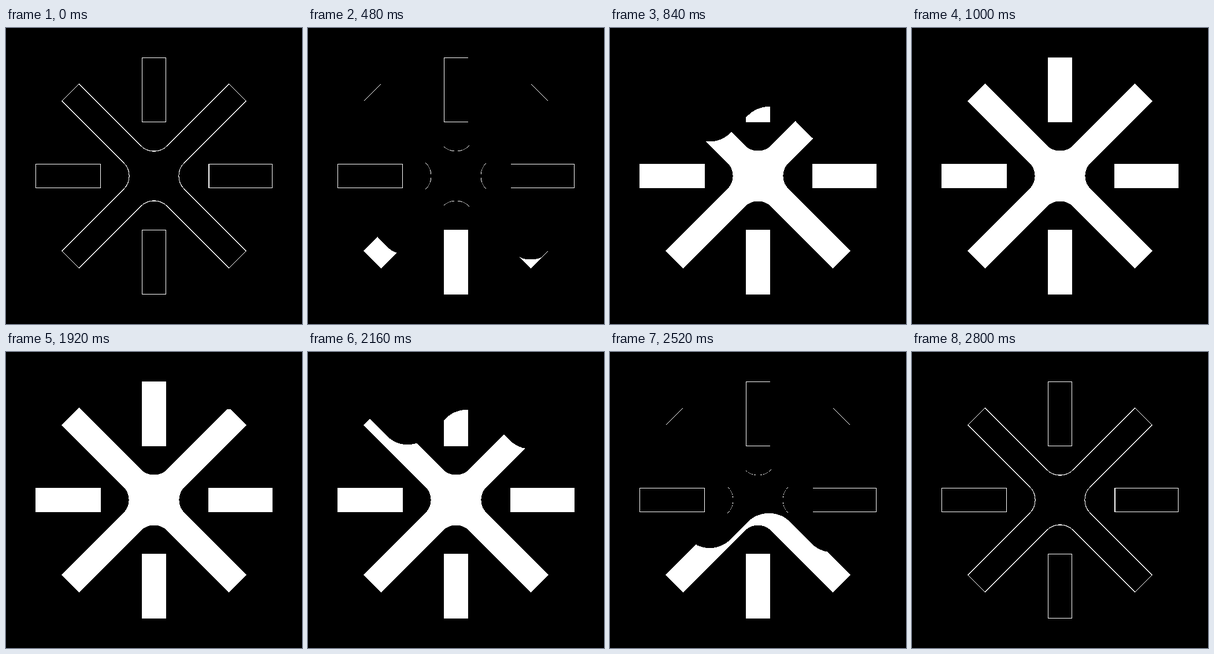
Recreate the animation shown at these times as an HTML page with a canvas. Size 512x512 px, loop 2.9 s.

```html
<!DOCTYPE html>
<html>
<head>
<meta charset="utf-8">
<style>
html, body { margin: 0; width: 100%; height: 100%; overflow: hidden; background: #000; }
canvas { display: block; }
</style>
</head>
<body>
<canvas id="stage" width="512" height="512"></canvas>
<script>
const ctx = document.getElementById('stage').getContext('2d', { willReadFrequently: true });
const LOOP = 2900, STEP = 40, FULL_WIDTH = 1.05;

// The star: a cross with rounded inner corners and four bars.
const star = new Path2D();
function cross(near, far, inner, radius) {
  for (let i = 0; i < 4; i++) {
    const c = [1, 0, -1, 0][i], s = [0, 1, 0, -1][i];
    const at = (x, y) => [256 + x * c - y * s, 256 + x * s + y * c];
    if (i) star.lineTo(...at(-near, -far));
    else star.moveTo(...at(-near, -far));
    star.arcTo(...at(0, -inner), ...at(near, -far), radius);
    star.lineTo(...at(near, -far));
  }
  star.closePath();
}
function bar(left, top, right, bottom) {
  star.rect(left, top, right - left, bottom - top);
}
cross(129.7, 159.3, 29.6, 32);
bar(235.4, 51.4, 276.95, 162.6);
bar(235.4, 349.4, 276.6, 460.6);
bar(51.4, 235.4, 163.6, 276.6);
bar(351, 235.4, 460.6, 276.6);

// Stretches of the outline that break up first as it thins.
const gaps = new Path2D('M186 157L234 205M186 355L234 307M308 234L313 229M308 278L313 283');

// Rounded zigzag surface of the fill.
const crests = [[68, 208], [172, 312.5], [275, 210], [385, 320], [490, 215], [600, 325]];
function surface(shift) {
  const p = new Path2D();
  p.moveTo(-40, 316 + shift);
  for (let i = 0; i < crests.length - 1; i++) {
    const [x, y] = crests[i], [nx, ny] = crests[i + 1];
    p.arcTo(x, y + shift, nx, ny + shift, 51);
  }
  p.lineTo(600, 325 + shift);
  p.lineTo(600, 900);
  p.lineTo(-40, 900);
  return p;
}

function fillShift(t) {
  if (t < 80 || t >= 2800) return 999;
  if (t < 1000) {
    const u = t - 680;
    return -0.555 * u - 0.00024 * u * u;
  }
  if (t < 1920) return -999;
  const u = t - 2440;
  return 0.567 * u + 0.00035 * u * u;
}

// The outline thins slowly, then quickly, and comes back the other way round.
function outlineWidth(t) {
  const u = t < 1000 ? (t - 60) / 660 : (2800 - t) / 397;
  return FULL_WIDTH * (1 - Math.min(1, Math.max(0, u)) ** 3);
}

function strokeStar(width) {
  ctx.lineWidth = width;
  ctx.strokeStyle = '#fff';
  ctx.stroke(star);
}

// Hard black and white, without grey edges.
function harden() {
  const img = ctx.getImageData(0, 0, 512, 512), d = img.data;
  for (let i = 0; i < d.length; i += 4) {
    d[i] = d[i + 1] = d[i + 2] = d[i] >= 127 ? 255 : 0;
  }
  ctx.putImageData(img, 0, 0);
}

function draw(t) {
  ctx.fillStyle = '#000';
  ctx.fillRect(0, 0, 512, 512);

  const width = outlineWidth(t);
  if (width >= 0.5) strokeStar(width);
  if (width < 0.82) {
    ctx.lineWidth = 3;
    ctx.strokeStyle = '#000';
    ctx.stroke(gaps);
  }

  ctx.save();
  ctx.clip(surface(fillShift(t)));
  ctx.fillStyle = '#fff';
  ctx.fill(star);
  strokeStar(FULL_WIDTH);
  ctx.restore();
  harden();
}

let start, last = -1;
function tick() {
  const now = performance.now();
  start ??= now;
  const t = Math.floor((now - start) % LOOP / STEP) * STEP;
  if (t !== last) draw(last = t);
  requestAnimationFrame(tick);
}
tick();
</script>
</body>
</html>
```
